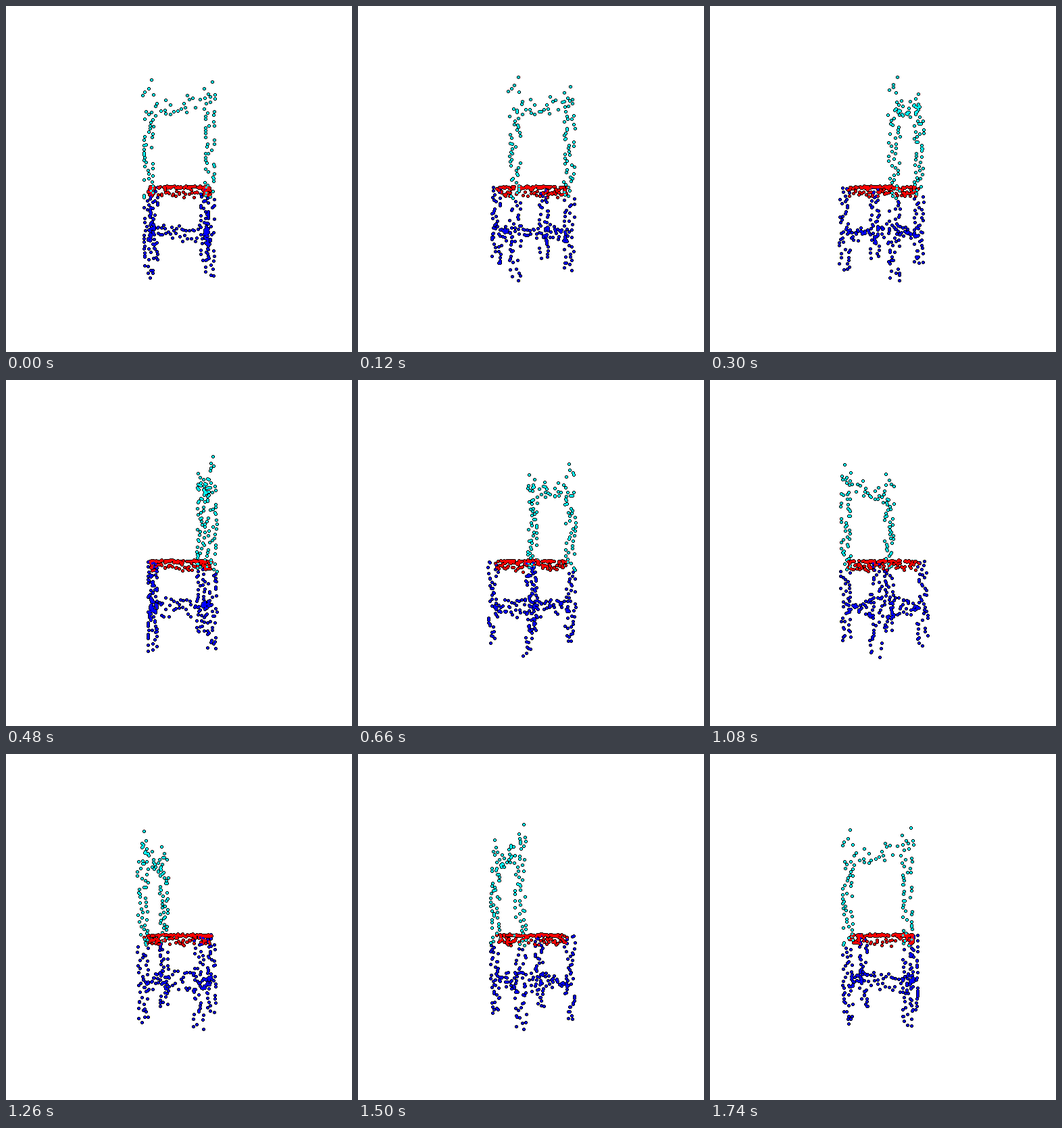
An HTML page with a canvas that plays this animation: 512 px wide and 512 px high, repeating every 1800 ms.

```html
<!DOCTYPE html>
<html lang="en">
<head>
<meta charset="utf-8">
<title>Rotating chair point cloud</title>
<style>
  html, body { margin: 0; width: 100%; height: 100%; overflow: hidden; background: #fff; }
  canvas { display: block; width: 512px; height: 512px; }
</style>
</head>
<body>
<canvas id="stage" width="512" height="512"></canvas>
<script>
const ctx = document.getElementById('stage').getContext('2d');
const CENTER = 256, CAMERA = 430, STEPS = 30, STEP_MS = 60;
const CYAN = '#00ffff', RED = '#ff0000', BLUE = '#0000ff';
const CORNER = 41, DEPTH = 40, HALF = 5.7;

let seed = 20;
function random() {
  seed = (seed + 0x6D2B79F5) | 0;
  let t = Math.imul(seed ^ (seed >>> 15), 1 | seed);
  t = (t + Math.imul(t ^ (t >>> 7), 61 | t)) ^ t;
  return ((t ^ (t >>> 14)) >>> 0) / 4294967296;
}
const between = (a, b) => a + (b - a) * random();
const spread = r => between(-r, r);

const points = [];
const add = (x, y, z, color) => points.push({ x, y, z, color });

// Random spots on the four faces of an upright square post.
function post(cx, cz, top, bottom, count, color) {
  for (let i = 0; i < count; i++) {
    const y = top + (bottom - top) * (i + random()) / count;
    const face = random() < 0.5 ? -HALF : HALF;
    const along = spread(HALF);
    const [dx, dz] = random() < 0.5 ? [face, along] : [along, face];
    add(cx + dx, y, cz + dz, color);
  }
}

// Four horizontal bars joining the corners.
function bars(reach, top, bottom, thick, count, color) {
  for (let i = 0; i < count; i++) {
    const along = -reach + 2 * reach * (i + random()) / count;
    for (const side of [-1, 1]) {
      add(along, between(top, bottom), side * DEPTH + spread(thick), color);
      add(side * CORNER + spread(thick), between(top, bottom), along, color);
    }
  }
}

// Top of the backrest, as seen straight on.
const crest = [
  [215, 109], [211, 122], [205, 127], [202, 132], [218, 131], [223, 144],
  [221, 148], [207, 156], [215, 157], [221, 162], [229, 155], [235, 154],
  [236, 139], [236, 159], [243, 146], [243, 160], [248, 156], [254, 155],
  [259, 152], [263, 144], [265, 150], [268, 132], [267, 157], [271, 138],
  [276, 136], [280, 150], [287, 138], [293, 122], [305, 112], [299, 130],
  [309, 131], [294, 136], [302, 134], [309, 137], [296, 144], [302, 142],
  [293, 152], [298, 158], [308, 156]
];
for (const [sx, sy] of crest) {
  const inPost = Math.abs(sx - CENTER) > 36;
  const z = DEPTH + spread(inPost ? HALF : 3);
  const unscale = (CAMERA - z) / CAMERA;
  add((sx - CENTER) * unscale, (sy - CENTER) * unscale, z, CYAN);
}

for (const side of [-1, 1]) {
  post(side * CORNER, DEPTH, -88, 26, 36, CYAN);
  post(side * CORNER, DEPTH, 26, 133, 36, BLUE);
  post(side * CORNER, -DEPTH, 10, 133, 40, BLUE);
}
bars(36, 72, 86, 3, 17, BLUE);
bars(34, 12, 25, 3, 18, RED);

// Seat top, with the corners left to the legs.
for (let i = 0; i < 62; i++) {
  const x = spread(43), z = spread(43);
  const reach = Math.abs(x) > 33 ? 33 / 43 : 1;
  add(x, between(11, 12.5), z * reach, RED);
}

function project({ x, y, z, color }, angle) {
  const c = Math.cos(angle), s = Math.sin(angle);
  const depth = z * c - x * s;
  const scale = CAMERA / (CAMERA - depth);
  return {
    x: Math.round(CENTER + (x * c + z * s) * scale),
    y: Math.round(CENTER + y * scale),
    depth, color
  };
}

function draw(step) {
  const angle = step / STEPS * 2 * Math.PI;
  const dots = points.map(p => project(p, angle)).sort((a, b) => a.depth - b.depth);
  ctx.fillStyle = '#fff';
  ctx.fillRect(0, 0, 512, 512);
  // Outlines go first so that touching dots merge.
  ctx.fillStyle = '#000';
  for (const { x, y } of dots) {
    ctx.fillRect(x - 2, y - 1, 5, 3);
    ctx.fillRect(x - 1, y - 2, 3, 5);
  }
  for (const { x, y, color } of dots) {
    ctx.fillStyle = color;
    ctx.fillRect(x - 1, y - 1, 3, 3);
  }
}

const start = performance.now();
function tick() {
  draw(Math.floor((performance.now() - start) / STEP_MS) % STEPS);
  requestAnimationFrame(tick);
}
tick();
</script>
</body>
</html>
```
